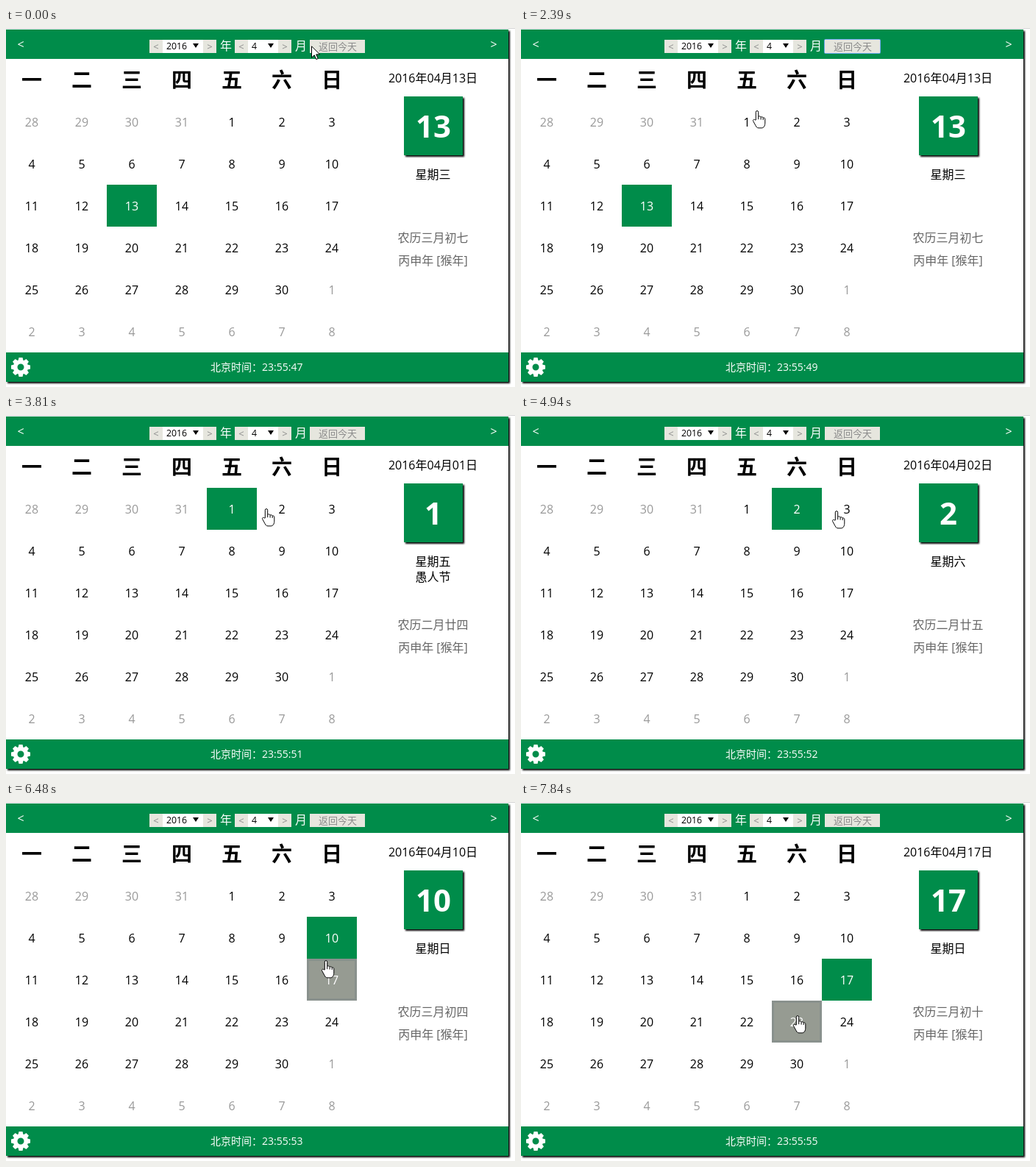
Recreate the animation shown at these times as an HTML page. Size 692 px wide and 488 px high, loop 8 s.

```html
<!DOCTYPE html>
<html lang="zh-CN">
<head>
<meta charset="utf-8">
<title>日历</title>
<style>
  html, body { margin: 0; width: 100%; height: 100%; overflow: hidden; background: #fff; }
  svg { display: block; width: 692px; height: 488px; }
  text {
    font: 16px "Open Sans", "Noto Sans", "Noto Sans CJK SC", "Noto Sans CJK", sans-serif;
    text-anchor: middle; white-space: pre;
  }
  .green { fill: #008c4a; }
  .white, .on { fill: #fff; }
  .shadow { filter: drop-shadow(2px 2px 1px #000); }
  .head { font-size: 28px; font-weight: 700; }
  .other { fill: #999; }
  .lunar { fill: #666; }
  .big { font-size: 42px; font-weight: 700; fill: #fff; }
  .ctl { font-size: 13px; fill: #8c8c8c; }
  .val { font-size: 12.3px; text-anchor: start; }
  .clock { font-size: 14px; text-anchor: start; fill: #fff; }
  .btn { fill: #e6e6de; }
  .hover { fill: #969b92; stroke: #89918d; stroke-width: 3; }
  .cursor { fill: #fff; stroke: #000; stroke-width: 1; stroke-linejoin: round; }
</style>
</head>
<body>
<svg viewBox="0 0 692 488">
  <rect width="692" height="1" fill="#d4d4d4"/>
  <rect class="white shadow" y="2" width="683" height="479"/>
  <rect class="green" y="2" width="683" height="40"/>
  <rect class="green" y="441" width="683" height="40"/>

  <text class="white" x="20" y="28">&lt;</text>
  <text class="white" x="663" y="28">&gt;</text>
  <g id="bar"></g>
  <text class="white" x="299" y="30">年</text>
  <text class="white" x="401" y="30">月</text>
  <rect class="btn" x="413" y="16" width="75" height="18"/>
  <text class="ctl" x="451" y="30">返回今天</text>
  <rect id="focus" x="412.5" y="15.5" width="76" height="19" rx="1" fill="none" stroke="#6eaaf0"/>

  <rect id="hover" class="hover" width="65" height="54"/>
  <rect id="pick" class="green" width="68" height="57"/>
  <g id="grid"></g>

  <text id="date" x="580.5" y="74"></text>
  <rect class="green shadow" x="541" y="93" width="80" height="80"/>
  <text id="num" class="big" x="581" y="149"></text>
  <text id="week" x="580.5" y="205"></text>
  <text id="fest" x="580.5" y="226"></text>
  <text id="lunar" class="lunar" x="580.5" y="291"></text>
  <text class="lunar" x="580.5" y="322">丙申年 [猴年]</text>

  <g id="gear" class="white" transform="translate(20 461)">
    <circle r="7.3" fill="none" stroke="#fff" stroke-width="5.6"/>
  </g>
  <text id="clock" class="clock" x="278" y="466"></text>

  <path id="arrow" class="cursor" d="M.5 .8V16.2L4.2 12.8 6.8 18.6 9.2 17.5 6.7 11.9H11.6Z"/>
  <path id="hand" class="cursor" d="M-1.7 13V2.3a1.7 1.7 0 0 1 3.4 0V8.6c.3-1.2 3.2-1 3.4.8c.4-1.1 3-.8 3.1 1c.6-.9 2.6-.4 2.6 1.3V17c0 4-1.8 6.9-4.6 6.9H2c-2.2 0-3-1.4-4-3.2L-5.3 14.6c-.9-1.9 1.2-3.1 2.4-1.6zM1.7 8.6V12.2M5.1 9.4V12.6M8.2 10.4V13"/>
</svg>
<script>
const LOOP = 8000;
const $ = id => document.getElementById(id);

function add(parent, tag, attrs, text = '') {
  const el = document.createElementNS('http://www.w3.org/2000/svg', tag);
  for (const k in attrs) el.setAttribute(k, attrs[k]);
  el.textContent = text;
  return parent.appendChild(el);
}

// year and month pickers
function picker(x, width, value) {
  const bar = $('bar'), end = x + 18 + width;
  const box = (cls, left, w) => add(bar, 'rect', { class: cls, x: left, y: 16, width: w, height: 18 });
  box('btn', x, 18);
  box('white', x + 18, width);
  box('btn', end, 18);
  add(bar, 'text', { class: 'ctl', x: x + 9, y: 30 }, '<');
  add(bar, 'text', { class: 'ctl', x: end + 9, y: 30 }, '>');
  add(bar, 'text', { class: 'val', x: x + 23, y: 29 }, value);
  add(bar, 'path', { d: `M${end - 14} 21h8l-4 6z` });
}
picker(195, 55, '2016');
picker(311, 41, '4');

for (let i = 0; i < 8; i++)
  add($('gear'), 'path', { d: 'M-3.4 -9 L-2.5 -13 H2.5 L3.4 -9Z', transform: `rotate(${i * 45})` });

// month grid: 42 cells, the 1st stands at index 4
[...'一二三四五六日'].forEach((c, i) =>
  add($('grid'), 'text', { class: 'head', x: 35 + 68 * i, y: 81 }, c));
const days = {};
for (let i = 0; i < 42; i++) {
  const own = i > 3 && i < 34;
  const label = i < 4 ? 28 + i : own ? i - 3 : i - 33;
  const el = add($('grid'), 'text', {
    class: own ? '' : 'other', x: 35 + 68 * (i % 7), y: 134 + 57 * Math.floor(i / 7)
  }, label);
  if (own) days[label] = el;
}

const info = {
  13: '三月初七', 1: '二月廿四', 2: '二月廿五', 3: '二月廿六', 10: '三月初四', 17: '三月初十'
};

// [time, day] steps
const picks = [[0, 13], [3430, 1], [4390, 2], [5360, 3], [6300, 10], [7190, 17]];
const hovers = [[0, 0], [300, 3], [760, 0], [2420, 1], [2560, 8], [3040, 1], [3840, 2],
  [4970, 3], [5740, 10], [5830, 17], [6050, 10], [6450, 17], [7550, 16], [7660, 23]];
const ticks = [870, 1810, 2810, 3800, 4810, 5810, 6630, 7810];

// cursor moves: [start, duration, x, y]; it rests in between
const moves = [
  [60, 360, 448, 126], [600, 240, 452, 84], [870, 380, 445, 22],
  [2180, 209, 330, 98], [2390, 0, 321, 112], [2420, 300, 305, 182], [2860, 210, 307, 136],
  [3580, 229, 340, 127], [3810, 0, 354, 127], [3840, 30, 371, 126], [4100, 30, 372, 126],
  [4720, 219, 408, 130], [4940, 0, 429, 130], [4970, 190, 434, 130],
  [5620, 280, 437, 228], [5900, 119, 437, 214], [6020, 0, 437, 200], [6050, 90, 437, 192],
  [6330, 300, 434, 238], [6860, 0, 434, 239], [7420, 420, 376, 290]
];

const at = (steps, t) => steps.findLast(s => s[0] <= t)[1];

function tip(t) {
  let x = 415, y = 24;
  for (const [from, span, toX, toY] of moves) {
    if (t < from) break;
    const k = span ? Math.min(1, (t - from) / span) : 1;
    x += (toX - x) * k;
    y += (toY - y) * k;
  }
  return [Math.round(x), Math.round(y)];
}

function place(el, day, inset) {
  el.style.display = day ? '' : 'none';
  const i = day + 3;
  el.setAttribute('x', 1 + 68 * (i % 7) + inset);
  el.setAttribute('y', 99 + 57 * Math.floor(i / 7) + inset);
}

function draw(now) {
  const t = now % LOOP;
  const pick = at(picks, t), hover = at(hovers, t);

  place($('pick'), pick, 0);
  place($('hover'), hover, 1.5);
  for (const d in days) days[d].setAttribute('class', d == pick || d == hover ? 'on' : '');

  $('date').textContent = `2016年04月${String(pick).padStart(2, '0')}日`;
  $('num').textContent = pick;
  $('week').textContent = '星期' + '一二三四五六日'[(pick + 3) % 7];
  $('fest').textContent = pick === 1 ? '愚人节' : '';
  $('lunar').textContent = '农历' + info[pick];
  $('clock').textContent = '北京时间：23:55:' + (47 + ticks.filter(s => s <= t).length);
  $('focus').style.display = t >= 1550 && t < 3430 ? '' : 'none';

  const [x, y] = tip(t), inGrid = y >= 99;
  $('arrow').style.display = inGrid ? 'none' : '';
  $('hand').style.display = inGrid ? '' : 'none';
  $(inGrid ? 'hand' : 'arrow').setAttribute('transform', `translate(${x} ${y})`);
}

const start = performance.now();
function tick() {
  draw(performance.now() - start);
  requestAnimationFrame(tick);
}
tick();
</script>
</body>
</html>
```
